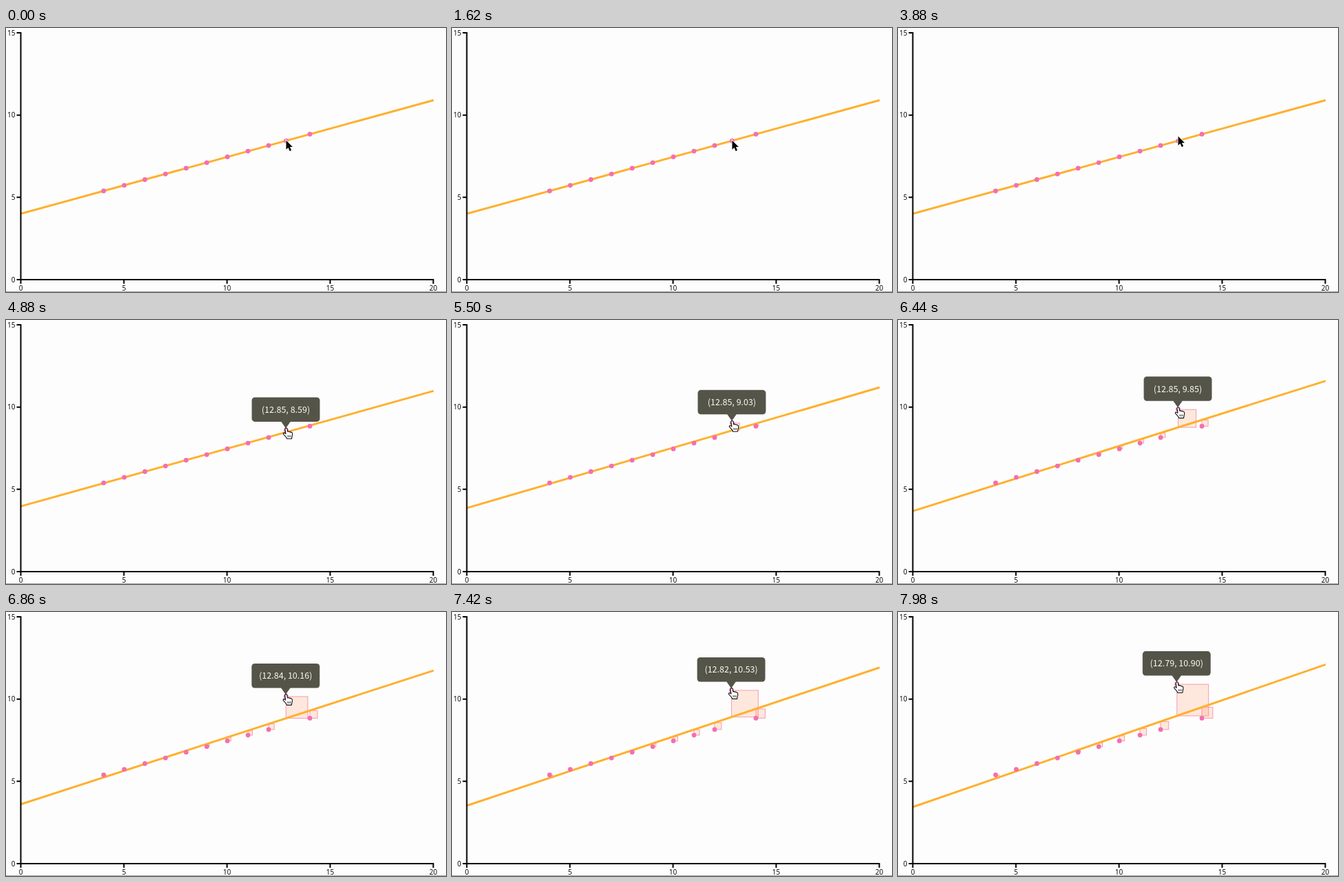
Animation of 640 by 384 pixels, one loop 8000 ms. Source, as an HTML page:

```html
<!DOCTYPE html>
<html lang="en">
<head>
<meta charset="utf-8">
<title>Least squares</title>
<style>
  html, body { margin: 0; width: 100%; height: 100%; overflow: hidden; background: #fdfdfe; }
  svg { display: block; width: 640px; height: 384px; }
  .axis path { fill: none; stroke: #000; stroke-width: 2; }
  .axis text { font: 10px "Noto Sans", "Open Sans", sans-serif; fill: #111; }
  #fit { stroke: #ffb02e; stroke-width: 3; }
  #squares rect { fill: #ff8c5a; fill-opacity: .2; stroke: #f28fa0; stroke-opacity: .85; }
  #dots circle { fill: #f56eb0; }
  #tip rect, #tip path { fill: #545448; }
  #tip text { font: 12.54px "Noto Sans CJK JP", "Noto Sans CJK SC", "Noto Sans", sans-serif; fill: #fbfbf3; text-anchor: middle; }
  #arrow { fill: #000; stroke: #fffff0; stroke-width: 1.6; paint-order: stroke; }
  #hand { fill: #fff; stroke: #111; stroke-width: 1.1; stroke-linejoin: round; }
</style>
</head>
<body>
<svg viewBox="0 0 640 384">
  <path d="M0 383.5H640" stroke="#a0a0a0"/>
  <g id="squares"></g>
  <line id="fit"/>
  <g class="axis" id="axes"></g>
  <g id="dots"></g>
  <g id="tip">
    <rect y="-48" height="35.5" rx="4.5"/>
    <path d="M-7 -13H7L0 -3Z"/>
    <text y="-25.7"></text>
  </g>
  <path id="arrow" d="M0 0V13.2L3 10.4L5.2 15.4L7.6 14.4L5.4 9.5H9.4Z"/>
  <g id="hand">
    <path d="M-1.6 1.2Q-1.5 -.3 0 -.3Q1.4 -.3 1.6 1.2L2.2 5Q3.6 4 4.7 5.4Q6 4.7 7 6Q8.6 5.6 9 7.4Q9.6 10 8.5 12.4L8 15.4H1.2Q.6 13.4 -1.4 11.4L-4 8.6Q-4.6 7 -3 6.7Q-1.8 6.7 -.6 8.2Z"/>
    <path fill="none" stroke-width=".8" d="M2.3 10.2L2.7 13M4.4 10.2L4.5 13M6.5 10.2L6.4 13"/>
  </g>
</svg>
<script>
const LOOP = 8000, HOVER = 4000, HELD = 10;
const $ = id => document.getElementById(id);
const px = x => 22 + 30 * x;
const py = y => 366 - y * 359 / 15;
const set = (el, attrs) => { for (const k in attrs) el.setAttribute(k, attrs[k]); return el; };
const add = (parent, name, attrs = {}) =>
  parent.appendChild(set(document.createElementNS('http://www.w3.org/2000/svg', name), attrs));

// Third Anscombe set, with the outlier as the last, draggable point.
const points = [5.39, 5.73, 6.08, 6.42, 6.77, 7.11, 7.46, 7.81, 8.15].map((y, i) => [i + 4, y]);
points.push([14, 8.84], [12.85, 8.43]);

// Keys are [time, value, slope per second].
const dragX = [[4530, 12.85, 0], [6440, 12.85, 0], [7420, 12.82, -.042], [8000, 12.79, -.055]];
const dragY = [[4530, 8.43, .35], [5500, 9.03, .85], [6440, 9.85, .78], [7420, 10.53, .68], [8000, 10.913, .66]];

function hermite(keys, t) {
  if (t <= keys[0][0]) return keys[0][1];
  const i = keys.findIndex(k => t <= k[0]);
  const [t0, a, m] = keys[i - 1], [t1, b, n] = keys[i];
  const d = (t1 - t0) / 1000, u = (t - t0) / (t1 - t0), v = 1 - u;
  return v * v * (a * (1 + 2 * u) + u * m * d) + u * u * (b * (3 - 2 * u) - v * n * d);
}

function regress() {
  const n = points.length;
  const mx = points.reduce((s, p) => s + p[0], 0) / n;
  const my = points.reduce((s, p) => s + p[1], 0) / n;
  let sxy = 0, sxx = 0;
  for (const [x, y] of points) { sxy += (x - mx) * (y - my); sxx += (x - mx) ** 2; }
  const k = sxy / sxx;
  return x => my + k * (x - mx);
}

function drawAxes() {
  const axes = $('axes');
  let d = 'M15.5 7H21.5V366H15.5M21.5 372V366H621.5V372';
  for (let v = 0; v <= 20; v += 5) {
    const x = px(v) - .5, y = py(v);
    d += `M${x} 366V372`;
    add(axes, 'text', { x, y: 381.5, 'text-anchor': 'middle' }).textContent = v;
    if (v > 15) continue;
    d += `M15.5 ${y}H21.5`;
    add(axes, 'text', { x: 13.5, y: y + 3.6, 'text-anchor': 'end' }).textContent = v;
  }
  add(axes, 'path', { d });
}

drawAxes();
const squares = points.map(() => add($('squares'), 'rect'));
const dots = points.map(() => add($('dots'), 'circle', { r: 3.4 }));
const [tipBox, , tipText] = $('tip').children;

function draw(t) {
  const x = hermite(dragX, t), y = hermite(dragY, t);
  points[HELD] = [x, y];
  const fit = regress();
  set($('fit'), { x1: 22, y1: py(fit(0)), x2: 622, y2: py(fit(20)) });

  points.forEach(([a, b], i) => {
    const top = py(Math.max(b, fit(a))), side = Math.abs(py(b) - py(fit(a)));
    set(squares[i], { x: px(a), y: top, width: side, height: side });
    set(dots[i], { cx: px(a), cy: py(b) });
  });

  const held = t >= HOVER, cx = px(x), cy = py(y);
  $('tip').style.display = $('hand').style.display = held ? '' : 'none';
  $('arrow').style.display = held ? 'none' : '';

  const label = `(${x.toFixed(2)}, ${y.toFixed(2)})`, w = label.length > 12 ? 99 : 92.5;
  if (tipText.textContent !== label) tipText.textContent = label;
  set(tipBox, { x: -w / 2, width: w });
  set($('tip'), { transform: `translate(${cx - .5} ${cy})` });
  set($('hand'), { transform: `translate(${cx} ${cy - 3})` });

  const lift = Math.min(1, Math.max(0, (t - 3640) / 240));
  set($('arrow'), { transform: `translate(407.5 ${163.5 - 6 * lift})` });
}

function frame() {
  draw(performance.now() % LOOP);
  requestAnimationFrame(frame);
}
frame();
</script>
</body>
</html>
```
